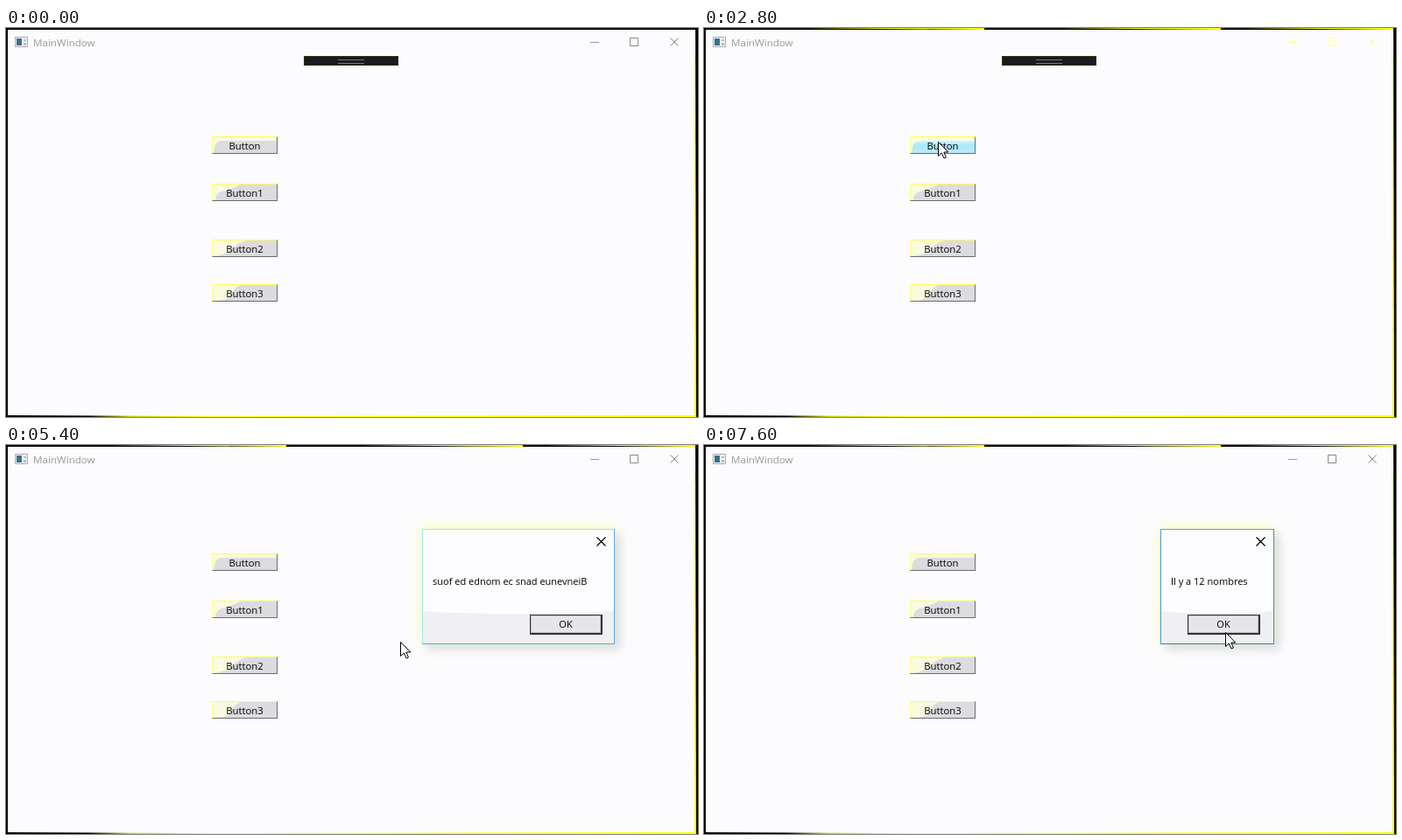
These frames come from a looping animation (790 px wide and 445 px high, 8 s). An HTML page:

```html
<!DOCTYPE html>
<html lang="fr">
<head>
<meta charset="utf-8">
<title>MainWindow</title>
<style>
html, body { margin: 0; width: 100%; height: 100%; overflow: hidden; background: #fcfcfe; }
#stage {
  position: relative; width: 790px; height: 445px; overflow: hidden;
  background: #fcfcfe; color: #000; font: 11.3px/16px "Open Sans", "Noto Sans", sans-serif;
}
#stage, #stage * { box-sizing: border-box; }
#stage div, #stage svg, #stage span { position: absolute; white-space: nowrap; }
#stage, .cursor, .hover, .dialog, .fade, .wipe { animation: 8s step-end infinite; }

/* Window colours follow activation */
#stage { animation-name: scene; }
@keyframes scene {
  0% { --title: #999; --min: #999; --max: #888; --bar: visible; --plain: 1; --rich: 0; --green: 0; }
  7.5%, 35% { --title: #999; --min: #ffff8c; --max: #ffffa0; --bar: visible; --plain: 0; --rich: 1; --green: 0; }
  37.5%, 60%, 67.5%, 70%, 87.5%, 100% { --title: #999; --min: #999; --max: #888; --bar: hidden; --plain: 0; --rich: 1; --green: 0; }
  62.5%, 65%, 72.5%, 85% { --title: #000; --min: #00dc00; --max: #000; --bar: visible; --plain: 0; --rich: 1; --green: 1; }
}

.frame { left: 0; top: 0; }
.title { left: 31px; top: 9px; font-size: 11.6px; color: var(--title); }
.toolbar {
  left: 340px; top: 32px; width: 108px; height: 11px; visibility: var(--bar);
  background: #1a1a20; border: 1px solid #34340c;
}
.toolbar::after {
  content: ""; position: absolute; left: 38px; top: 3px; width: 30px; height: 3px;
  border: solid #77777c; border-width: 1px 0;
}

.button {
  left: 235px; width: 75px; height: 20px; overflow: hidden; text-align: center;
  background: #dcdce0; border: 1px solid; border-color: #ffff58 #6c6c70 #6c6c70 #ffff8c;
}
.button svg { left: 0; top: 0; fill: #ffffe0; opacity: .85; }
.button span { left: 0; width: 73px; top: 2px; }
.hover { inset: 0; opacity: 0; background: linear-gradient(#e6fbff 10%, #a9e9fb 50%, #bdeafc); }
.h0 { animation-name: hover0; }
.h1 { animation-name: hover1; }
.h2 { animation-name: hover2; }
.h3 { animation-name: hover3; }
@keyframes hover0 { 32.5% { opacity: 1; } 37.5%, 100% { opacity: 0; } }
@keyframes hover1 { 25% { opacity: 1; } 27.5%, 100% { opacity: 0; } }
@keyframes hover2 { 65% { opacity: 1; } 67.5%, 100% { opacity: 0; } }
@keyframes hover3 { 82.5% { opacity: 1; } 87.5%, 100% { opacity: 0; } }

.dialog {
  top: 96px; height: 132px; background: #fdfdff; visibility: hidden;
  border: 1px solid; border-color: #4aa6dc #4a88b8 #3a7cb4 #3a9ce0;
  box-shadow: -2px -2px 13px rgba(255,255,120,.5), 6px 6px 10px rgba(200,200,215,.65);
}
.foot { left: 0; right: 0; bottom: 0; height: 38px; background: #f0f0f3; }
.foot::before {
  content: ""; position: absolute; left: 0; right: 0; top: -4px; height: 8px;
  background: #fdfdff; border-radius: 0 0 50% 50%;
}
.message { left: 11px; top: 51px; font-size: 11px; }
.ok {
  right: 15px; top: 97px; width: 83px; height: 23px; text-align: center; line-height: 20px;
  background: #e6e6ea; border: 1px solid #333; border-right-width: 2px; border-bottom-width: 2px;
  box-shadow: inset 0 0 0 1px #b9c2cb; font-size: 11px;
}
.shut { right: 9px; top: 8px; stroke: #000; stroke-width: 1.2; }
.d1 { left: 512px; width: 148px; animation-name: show1; }
.d2 { left: 475px; width: 220px; animation-name: show2; }
.d2 .ok { right: 13px; }
.d3 { left: 521px; width: 130px; animation-name: show3; }
@keyframes show1 { 37.5% { visibility: visible; } 50%, 100% { visibility: hidden; } }
@keyframes show2 {
  50% { visibility: visible; transform: none; }
  60% { visibility: visible; transform: scale(.985); border-color: #9be6f0 #58a8e0 #58a8e0 #9be6f0; }
  62.5% { visibility: hidden; transform: none; }
  67.5% { visibility: visible; transform: none; }
  72.5%, 100% { visibility: hidden; transform: none; }
}
@keyframes show3 { 87.5%, 99.99% { visibility: visible; } 100% { visibility: hidden; } }
.fade { animation-name: fade; }
@keyframes fade { 60% { opacity: .75; } 62.5%, 100% { opacity: 1; } }
.wipe { left: 8px; top: 50px; width: 195px; height: 7px; background: #fefef0; opacity: 0; animation-name: wipe; }
@keyframes wipe { 60% { opacity: 1; } 62.5%, 100% { opacity: 0; } }

.cursor { left: 0; top: 0; fill: #fff; stroke: #000; animation-name: move; }
@keyframes move {
  0%, 100% { transform: translate(790px, 300px); }
  7.5% { transform: translate(760px, 300px); }
  10% { transform: translate(660px, 290px); }
  12.5% { transform: translate(560px, 270px); }
  15% { transform: translate(470px, 250px); }
  17.5% { transform: translate(390px, 228px); }
  20% { transform: translate(330px, 208px); }
  22.5% { transform: translate(298px, 198px); }
  25% { transform: translate(292px, 188px); }
  27.5% { transform: translate(284px, 170px); }
  30% { transform: translate(276px, 152px); }
  32.5% { transform: translate(270px, 138px); }
  35%, 37.5% { transform: translate(267px, 130px); }
  40% { transform: translate(360px, 155px); }
  42.5% { transform: translate(490px, 185px); }
  45%, 47.5% { transform: translate(598px, 205px); }
  50% { transform: translate(453px, 196px); }
  52.5% { transform: translate(545px, 202px); }
  55%, 60% { transform: translate(619px, 205px); }
  62.5% { transform: translate(480px, 218px); }
  65% { transform: translate(275px, 250px); }
  67.5% { transform: translate(450px, 225px); }
  70% { transform: translate(633px, 203px); stroke: #000; }
  72.5% { transform: translate(633px, 203px); stroke: #d8d840; }
  75% { transform: translate(540px, 235px); stroke: #000; }
  77.5% { transform: translate(420px, 270px); }
  80% { transform: translate(310px, 290px); }
  82.5%, 87.5% { transform: translate(265px, 300px); }
  90% { transform: translate(380px, 270px); }
  92.5% { transform: translate(510px, 236px); }
  95%, 99.99% { transform: translate(595px, 214px); }
}
</style>
</head>
<body>
<div id="stage">
  <svg class="frame" width="790" height="445">
    <defs>
      <linearGradient id="base">
        <stop offset=".12"/><stop offset=".18" stop-color="#cc0"/><stop offset=".3" stop-color="#ff0"/>
      </linearGradient>
    </defs>
    <path d="M0 0H2V445H0ZM0 0H787V2H0Z"/>
    <path d="M110 0H320V2ZM400 0H590V2ZM610 0H787V2Z" fill="#ff0" style="opacity:var(--rich)"/>
    <path d="M0 443L210 444L787 443V445H0Z" fill="url(#base)"/>
    <path d="M786.5 30H788V445H786Z" fill="#ff0"/>
    <path d="M787 0H790V445H788Z"/>
    <path d="M787 2H789V440H788Z" fill="#00c800" style="opacity:var(--green)"/>

    <path d="M10.5 10.5H24.5V21.5H10.5Z" fill="#f4f4f6" stroke="#aaa"/>
    <path d="M12 12H18V20H12Z" fill="#38738b"/>
    <path d="M20 13H23V15H20ZM20 17H23V20H20Z" fill="#bbb"/>
    <g fill="none">
      <path d="M667 16.5H677" style="stroke:var(--min)"/>
      <path d="M712.5 11.5H721.5V20.5H712.5ZM758.5 11.5L767.5 20.5M767.5 11.5L758.5 20.5" style="stroke:var(--max)"/>
    </g>
  </svg>
  <div class="title">MainWindow</div>
  <div class="toolbar"></div>

  <div class="button" style="top:124px">
    <div class="hover h0"></div>
    <svg width="73" height="18"><path d="M0 0H73V4H10Q2 4 1 18H0Z"/></svg>
    <span>Button</span>
  </div>
  <div class="button" style="top:178px">
    <div class="hover h1"></div>
    <svg width="73" height="18"><path d="M0 0H31Q20 6 10 8Q3 11 3 18H0Z"/></svg>
    <span>Button1</span>
  </div>
  <div class="button" style="top:242px">
    <div class="hover h2"></div>
    <svg width="73" height="18"><path d="M0 0H38Q28 3 23 9T4 18H0Z"/></svg>
    <span>Button2</span>
  </div>
  <div class="button" style="top:293px">
    <div class="hover h3"></div>
    <svg width="73" height="18"><path d="M0 0H33Q25 2 22 9T8 18H0Z"/></svg>
    <span>Button3</span>
  </div>

  <div class="dialog d1">
    <div class="foot"></div>
    <svg class="shut" width="11" height="11"><path d="M.5 .5L10.5 10.5M10.5 .5L.5 10.5"/></svg>
    <div class="message">Bnvn dns c mnd d fs</div>
    <div class="ok">OK</div>
  </div>
  <div class="dialog d2">
    <div class="foot"></div>
    <svg class="shut fade" width="11" height="11"><path d="M.5 .5L10.5 10.5M10.5 .5L.5 10.5"/></svg>
    <div class="message fade">suof ed ednom ec snad eunevneiB</div>
    <div class="wipe"></div>
    <div class="ok fade">OK</div>
  </div>
  <div class="dialog d3">
    <div class="foot"></div>
    <svg class="shut" width="11" height="11"><path d="M.5 .5L10.5 10.5M10.5 .5L.5 10.5"/></svg>
    <div class="message">Il y a 12 nombres</div>
    <div class="ok">OK</div>
  </div>

  <svg class="cursor" width="14" height="21"><path d="M.5 .5V16.5L4.3 13L7 19L9.4 18L6.8 12H11.8Z"/></svg>
</div>
</body>
</html>
```
